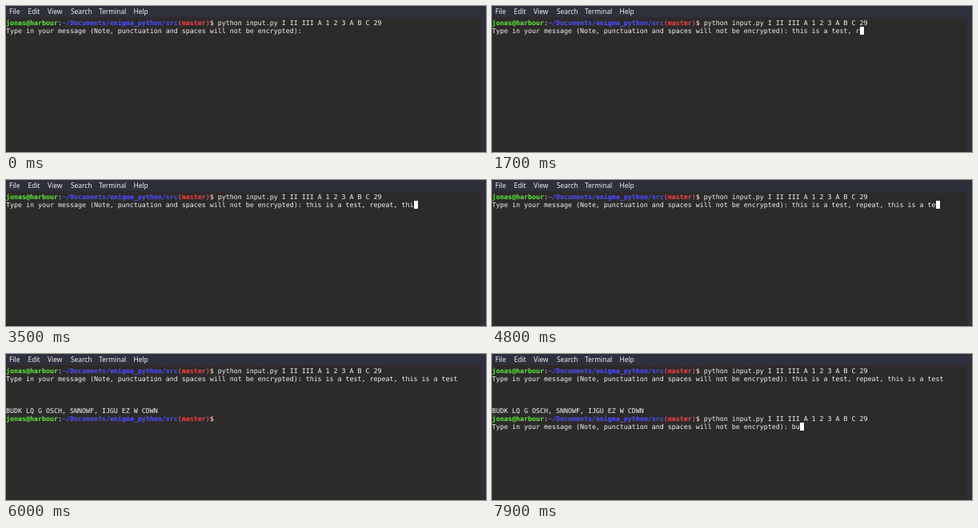
An HTML page that plays this animation: 600x183 px, repeating every 8000 ms.

```html
<!DOCTYPE html>
<html lang="en">
<head>
<meta charset="utf-8">
<title>Terminal session</title>
<style>
  html, body { margin: 0; width: 600px; height: 183px; overflow: hidden; }
  body { position: relative; background: #2d2a2a; }
  .menu { position: absolute; inset: 0 0 auto; height: 14px; background: #2e303c; }
  .menu span {
    position: absolute; top: 0; line-height: 14px; color: #f0f0f0;
    font-family: "Noto Sans", sans-serif; font-size: 8.4px;
  }
  .bar { position: absolute; top: 14px; right: 0; bottom: 0; width: 6px; background: #2e303c; }
  .line {
    position: absolute; left: 0; height: 10px; line-height: 10px;
    white-space: pre; color: #f4f4f4; text-rendering: geometricPrecision;
    font-family: "DejaVu Sans Mono", monospace; font-size: 8.305px;
  }
  b { color: #5af03c; }
  .path { color: #5050ff; }
  .branch { color: #f04646; }
  #cursor { position: absolute; width: 5px; height: 10px; background: #fff; }
</style>
</head>
<body>
<div class="menu">
  <span style="left:4px">File</span>
  <span style="left:27.5px">Edit</span>
  <span style="left:52px">View</span>
  <span style="left:81px">Search</span>
  <span style="left:116px">Terminal</span>
  <span style="left:159.5px">Help</span>
</div>
<div class="bar"></div>
<div id="screen"></div>
<div id="cursor"></div>
<script>
  const LOOP = 8000, CELL = 5, ROW = 10, TOP = 16;
  const prompt = '<b>jonas@harbour</b>:<b class="path">~/Documents/enigma_python/src</b>' +
    '<b class="branch">(master)</b>$ ';
  const promptLength = 53;
  const command = 'python input.py I II III A 1 2 3 A B C 29';
  const question = 'Type in your message (Note, punctuation and spaces will not be encrypted): ';
  const message = 'this is a test, repeat, this is a test';
  const cipher = 'BUDK LQ G OSCH, SNNOWF, IJGU EZ W CDWN';

  // Bursts of typing: [start ms, end ms, first length, last length], one step per 100 ms
  const bursts = [
    [100, 800, 1, 8], [1000, 1300, 9, 12], [1400, 2400, 14, 24],
    [2700, 2700, 23, 23], [2900, 2900, 22, 22],
    [3200, 3300, 23, 24], [3400, 3800, 26, 30],
    [4100, 4100, 29, 29], [4300, 4500, 30, 32], [4600, 5000, 34, 38]
  ];

  // Two slips that are deleted again
  function typed(t) {
    let count = 0;
    for (const [start, end, from, to] of bursts) {
      if (t >= start) count = Math.min(to, from + Math.floor((t - start) / 100));
    }
    let text = message;
    if (t < 2900) text = 'this is a test, repeat t';
    else if (t >= 3800 && t < 4100) text = 'this is a test, repeat, this a';
    return text.slice(0, count);
  }

  function cursorShown(t) {
    return t >= 100 && !(t >= 5900 && t < 6500) && !(t >= 7500 && t < 7800);
  }

  function scene(t) {
    const input = typed(t);
    const rows = [prompt + command, question + input];
    let at = [1, question.length + input.length];
    if (t >= 5300) at = [2, 0];
    if (t >= 5400) {
      rows[5] = cipher;
      rows[6] = prompt;
      at = [6, promptLength];
    }
    if (t >= 6700) {
      rows[6] += command;
      at = [6, promptLength + command.length];
    }
    if (t >= 6900) at = [7, 0];
    if (t >= 7000) {
      const reply = t < 7800 ? '' : t < 7900 ? 'b' : 'bu';
      rows[7] = question + reply;
      at = [7, question.length + reply.length];
    }
    return { rows, at };
  }

  const screen = document.getElementById('screen');
  const cursor = document.getElementById('cursor');
  const lines = Array.from({ length: 8 }, (_, i) => {
    const line = document.createElement('div');
    line.className = 'line';
    line.style.top = TOP + i * ROW + 'px';
    screen.append(line);
    return line;
  });
  const shown = [];

  function draw(now) {
    const t = now % LOOP;
    const { rows, at } = scene(t);
    lines.forEach((line, i) => {
      const html = rows[i] || '';
      if (shown[i] !== html) line.innerHTML = shown[i] = html;
    });
    cursor.style.left = at[1] * CELL + 'px';
    cursor.style.top = TOP + at[0] * ROW - 0.5 + 'px';
    cursor.style.visibility = cursorShown(t) ? 'visible' : 'hidden';
  }

  const begin = performance.now();
  function tick() {
    draw(performance.now() - begin);
    requestAnimationFrame(tick);
  }
  tick();
</script>
</body>
</html>
```
